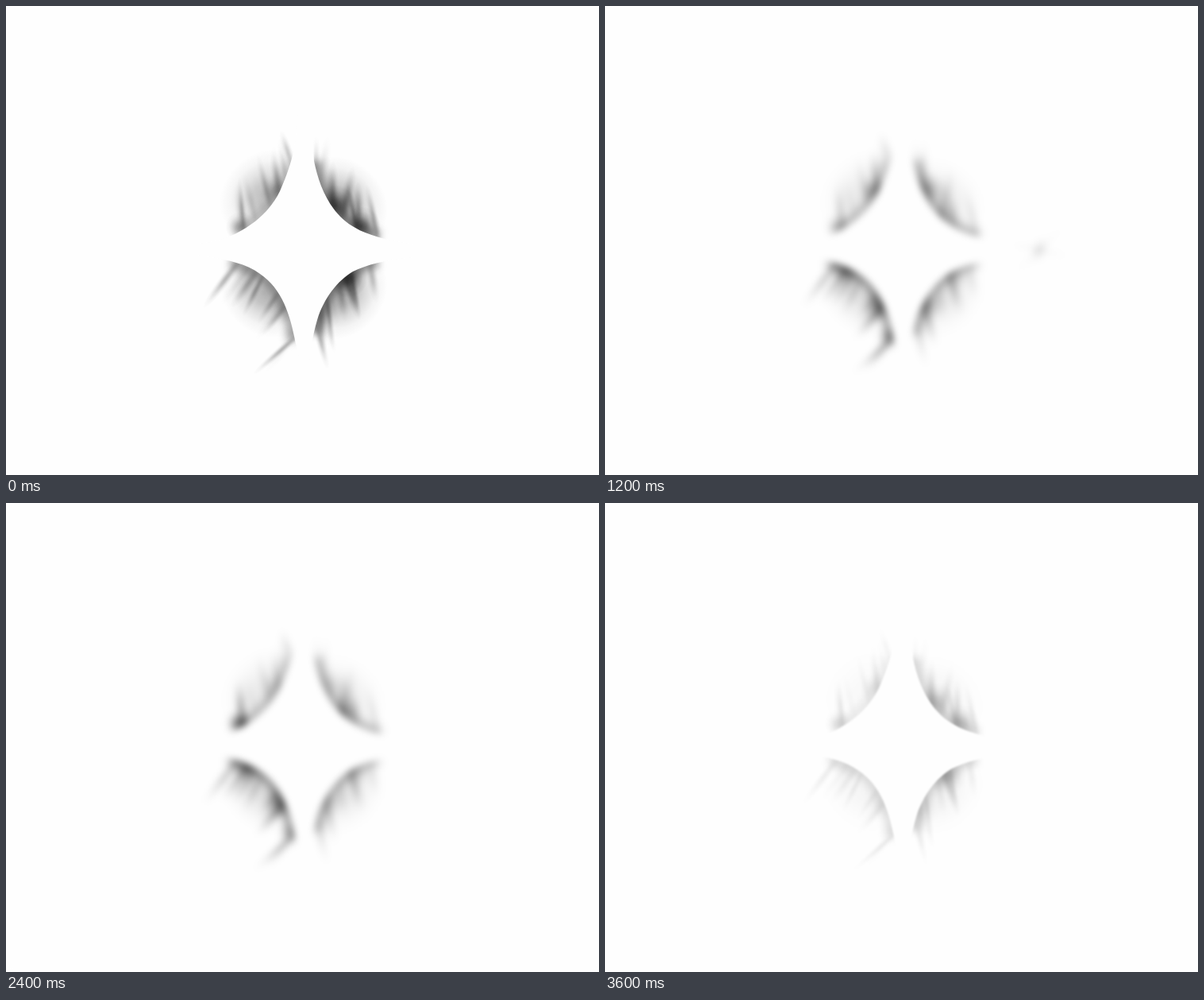
An HTML page for the animation above (3.64 s loop, 747 by 590 pixels).

```html
<!DOCTYPE html>
<html lang="en">
<head>
<meta charset="utf-8">
<title>Shadowed star</title>
<style>
  html, body { margin: 0; width: 100%; height: 100%; overflow: hidden; background: #fefefe; }
  svg { display: block; width: 747px; height: 590px; }
</style>
</head>
<body>
<svg viewBox="0 0 747 590">
  <defs>
    <radialGradient id="soft">
      <stop offset="0" stop-color="#111"/>
      <stop offset=".25" stop-color="#111" stop-opacity=".8"/>
      <stop offset=".5" stop-color="#111" stop-opacity=".42"/>
      <stop offset=".75" stop-color="#111" stop-opacity=".13"/>
      <stop offset="1" stop-color="#111" stop-opacity="0"/>
    </radialGradient>
    <filter id="focus" filterUnits="userSpaceOnUse" x="0" y="0" width="747" height="590" color-interpolation-filters="sRGB">
      <feGaussianBlur id="lens" stdDeviation="0"/>
    </filter>
    <filter id="feather" filterUnits="userSpaceOnUse" x="0" y="0" width="747" height="590" color-interpolation-filters="sRGB">
      <feGaussianBlur stdDeviation="5"/>
    </filter>
  </defs>
  <rect width="747" height="590" fill="#fefefe"/>
  <g filter="url(#focus)">
    <rect width="747" height="590" fill="#fefefe"/>
    <g id="shade" fill="url(#soft)"></g>
    <g id="rims" filter="url(#feather)" fill="none" stroke="#111" stroke-width="17"></g>
    <path fill="#fefefe" d="M368 120C367 170 362 195 345 233C336 252 318 272 290 286C275 293 262 298 240 299V313C270 318 300 322 320 337C348 356 358 388 365 425C368 435 371 450 372 475H380C382 440 386 415 392 395C400 368 418 345 437 334C455 325 480 319 515 316V300C480 295 455 288 440 279C408 262 394 225 388 195C387 175 387 150 387 120Z"/>
  </g>
</svg>
<script>
const LOOP = 3640, STEP = 40, BEAT = 1200, TAU = 2 * Math.PI;
const NS = 'http://www.w3.org/2000/svg';
const lens = document.getElementById('lens');

// edge: quadratic curve along the star; out: direction away from it;
// aim: angle of the rays; sway: how far lumps slide along the edge.
const corners = [
  { edge: [[361, 195], [347, 255], [290, 286]], out: [-.7, -.7], aim: -97, gain: .6, sway: 0, left: true,
    lumps: [{ u: .38, r: 21, weight: 1, peak: .2 }, { u: .92, r: 19, weight: 1.5, peak: .75 }] },
  { edge: [[388, 195], [398, 270], [470, 291]], out: [.7, -.7], aim: -90, gain: .9, sway: .12, left: false,
    lumps: [{ u: .36, r: 26, weight: 1, peak: .14 }, { u: .68, r: 25, weight: 1, peak: .9 }] },
  { edge: [[282, 322], [350, 330], [364, 418]], out: [-.7, .7], aim: 127, gain: 1, sway: 0, left: true,
    lumps: [{ u: .2, r: 23, weight: .85, peak: .5 }, { u: .7, r: 25, weight: .85, peak: .5 }, { u: .97, r: 18, weight: .6, peak: .4 }] },
  { edge: [[388, 412], [398, 338], [468, 320]], out: [.7, .7], aim: 72, gain: 1, sway: -.04, left: false,
    lumps: [{ u: .28, r: 25, weight: .7, peak: .35 }, { u: .7, r: 25, weight: .95, peak: 0 }] },
];

let seed = 11;
const random = () => (seed = seed * 16807 % 2147483647) / 2147483647;
const clamp = v => Math.max(0, Math.min(1, v));

function add(parent, tag, attrs) {
  const el = document.createElementNS(NS, tag);
  for (const k in attrs) el.setAttribute(k, attrs[k]);
  return document.getElementById(parent).appendChild(el);
}
const oval = (rx, ry) => add('shade', 'ellipse', { rx, ry });

function place(el, x, y, turn, alpha) {
  el.setAttribute('transform', `translate(${x} ${y}) rotate(${turn})`);
  el.setAttribute('opacity', clamp(alpha).toFixed(3));
}

function onEdge({ edge: [a, b, c], out }, u, gap) {
  const v = 1 - u;
  return [0, 1].map(i => v * v * a[i] + 2 * v * u * b[i] + u * u * c[i] + out[i] * gap);
}

// A ray starts on the edge and fades along its aim.
function castRay(el, corner, u, length, turn, alpha) {
  const [x, y] = onEdge(corner, u, 0), a = turn * TAU / 360;
  place(el, x + Math.cos(a) * length / 2, y + Math.sin(a) * length / 2, turn, alpha);
}

for (const c of corners) {
  const [a, b, d] = c.edge;
  c.rim = add('rims', 'path', { d: `M${a}Q${b} ${d}` });
  c.haze = oval(62, 50);
  for (const l of c.lumps) {
    l.body = oval(l.r, l.r);
    l.ray = oval(40, 8);
  }
  c.rays = Array.from({ length: 6 }, (_, i) => {
    const length = 30 + 18 * random();
    return { el: oval(length, 5 + 4 * random()), length, u: (i + .6 * random()) / 5.6,
      turn: c.aim + 24 * (random() - .5), alpha: .1 + .28 * random() };
  });
}
const glint = [15, 12, 135].map((turn, i) => ({ el: i ? oval(46, 5) : oval(11, 18), turn, alpha: i ? .04 : .1 }));

function draw(t) {
  const drift = Math.cos(TAU * t / LOOP);
  const swing = .5 - .5 * drift;
  const pulse = .5 + .5 * Math.cos(TAU * t / BEAT);
  const fade = 1 - .65 * clamp((t - 3100) / 500);
  const opening = clamp(1 - t / 300);
  const levels = { left: (.1 + .25 * swing + .45 * pulse) * fade, right: (.6 - .3 * swing + .15 * pulse) * fade };

  lens.setAttribute('stdDeviation', Math.min(4, t / 75, 1 + (LOOP - STEP - t) / 200).toFixed(2));

  for (const c of corners) {
    const level = c.gain * (c.left ? levels.left : levels.right);
    c.rim.setAttribute('opacity', (level * .6).toFixed(3));
    place(c.haze, ...onEdge(c, .5, 16), c.out[0] * c.out[1] > 0 ? -45 : 45, level * .2 + opening * .2);
    for (const l of c.lumps) {
      const u = clamp(l.u + c.sway * drift);
      const swell = .65 + .35 * Math.cos(TAU * (t / LOOP - l.peak));
      const alpha = level * l.weight * swell;
      place(l.body, ...onEdge(c, u, 5), 0, alpha);
      castRay(l.ray, c, u, 40, c.aim, alpha * .55);
    }
    for (const r of c.rays) castRay(r.el, c, r.u, r.length, r.turn, r.alpha * (level + opening * .3));
  }

  const flash = Math.exp(-(((t - BEAT) / 250) ** 2));
  for (const g of glint) place(g.el, 547, 307, g.turn, g.alpha * flash);
}

let start;
function tick(now) {
  start ??= now;
  draw(Math.floor(((now - start) % LOOP) / STEP) * STEP);
  requestAnimationFrame(tick);
}
draw(0);
requestAnimationFrame(tick);
</script>
</body>
</html>
```
